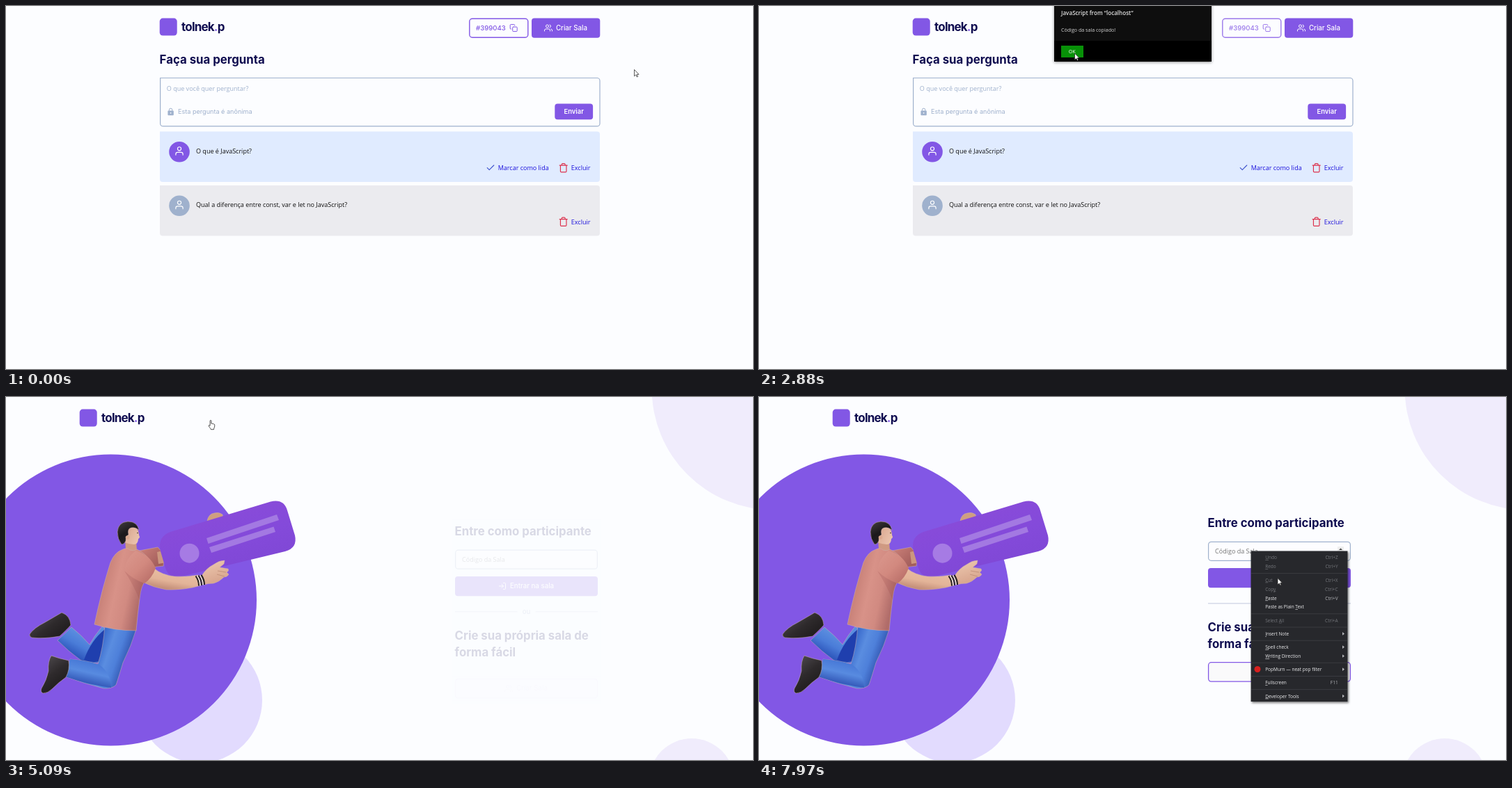
Animation, 1073 px wide and 522 px high, one loop 8 s. Source, as an HTML page with a canvas:

```html
<!DOCTYPE html>
<html lang="pt-BR">
<head>
<meta charset="utf-8">
<title>Sala de perguntas</title>
<style>
html, body { margin: 0; width: 100%; height: 100%; overflow: hidden; background: #fcfdff; }
canvas { position: absolute; left: 0; top: 0; }
#dialog {
  position: absolute; left: 424px; top: -20px; width: 226px; height: 100px;
  background: linear-gradient(#0e0e0e 70px, #000 70px);
  box-shadow: 0 1px 4px rgba(0, 0, 0, .45);
  transform-origin: 50% 44px;
  font: 7.1px/10px "Open Sans", sans-serif; color: #d4d4d4;
}
#dialog * { position: absolute; left: 10px; margin: 0; white-space: nowrap; }
#dialog h1 { top: 25px; font-size: 8.1px; font-weight: 600; color: #dedede; }
#dialog p { top: 49px; }
#dialog b {
  left: 9.5px; top: 77px; width: 32.5px; height: 17px; box-sizing: border-box;
  border: 1px solid #0a8f0a; font-weight: 400; line-height: 15px; text-align: center; color: #0fa00f;
}
#dialog b.hot { background: #079107; color: #fff; }
</style>
</head>
<body>
<canvas id="page" width="1073" height="522"></canvas>
<div id="dialog">
  <h1>JavaScript from “localhost”</h1>
  <p>Código da sala copiado!</p>
  <b id="ok">OK</b>
</div>
<canvas id="top" width="1073" height="522"></canvas>
<script>
const LOOP = 8000;
const PAPER = '#fcfdff', PURPLE = '#8257e5', NAVY = '#0e0b4f', STEEL = '#9fb1cd', LINK = '#1a10dc', RED = '#dc2f4b';
const BODY = '"Open Sans", "Noto Sans", sans-serif', HEAD = 'Inter, Roboto, sans-serif';
const $ = id => document.getElementById(id);
const c = $('page').getContext('2d'), top2d = $('top').getContext('2d');

// progress in n equal steps, the first at a and the last at b
const step = (t, a, b, n) =>
  t < a ? 0 : Math.min(1, (Math.floor((t - a + 8) * (n - 1) / (b - a)) + 1) / n);
const ease = p => p * p * (3 - 2 * p);

function text(s, x, y, size, color, weight = 400, family = BODY, align = 'left') {
  c.font = `${weight} ${size}px ${family}`;
  c.textAlign = align;
  c.fillStyle = color;
  c.fillText(s, x, y);
}
function box(x, y, w, h, r, fill, line, lw = 1.2) {
  c.beginPath();
  c.roundRect(x, y, w, h, r);
  if (fill) { c.fillStyle = fill; c.fill(); }
  if (line) { c.strokeStyle = line; c.lineWidth = lw; c.stroke(); }
}
function disc(x, y, r, fill) {
  c.beginPath();
  c.arc(x, y, r, 0, 7);
  c.fillStyle = fill;
  c.fill();
}
function shape(d, fill) {
  c.fillStyle = fill;
  c.fill(new Path2D(d));
}
// filled shape with a soft light rim
function solid(d, fill) {
  shape(d, fill);
  c.strokeStyle = 'rgba(205,175,175,.5)';
  c.lineWidth = 1;
  c.stroke(new Path2D(d));
}
function ramp(x0, y0, x1, y1, ...colors) {
  const g = c.createLinearGradient(x0, y0, x1, y1);
  colors.forEach((k, i) => g.addColorStop(i / (colors.length - 1), k));
  return g;
}

const ICONS = {
  user: 'M20 21v-2a4 4 0 0 0-4-4H8a4 4 0 0 0-4 4v2M16 7a4 4 0 1 1-8 0a4 4 0 1 1 8 0',
  users: 'M17 21v-2a4 4 0 0 0-4-4H5a4 4 0 0 0-4 4v2M13 7a4 4 0 1 1-8 0a4 4 0 1 1 8 0M23 21v-2a4 4 0 0 0-3-3.87M16 3.13a4 4 0 0 1 0 7.75',
  copy: 'M11 9h9a2 2 0 0 1 2 2v9a2 2 0 0 1-2 2h-9a2 2 0 0 1-2-2v-9a2 2 0 0 1 2-2M5 15H4a2 2 0 0 1-2-2V4a2 2 0 0 1 2-2h9a2 2 0 0 1 2 2v1',
  trash: 'M3 6H21M19 6v14a2 2 0 0 1-2 2H7a2 2 0 0 1-2-2V6m3 0V4a2 2 0 0 1 2-2h4a2 2 0 0 1 2 2v2',
  check: 'M20 6L9 17L4 12',
  enter: 'M15 3h4a2 2 0 0 1 2 2v14a2 2 0 0 1-2 2h-4M10 17L15 12L10 7M15 12H3'
};
function icon(name, x, y, scale, color, lw = 2) {
  c.save();
  c.translate(x - 12 * scale, y - 12 * scale);
  c.scale(scale, scale);
  c.strokeStyle = color;
  c.lineWidth = lw;
  c.lineCap = c.lineJoin = 'round';
  c.stroke(new Path2D(ICONS[name]));
  c.restore();
}

function logo(x) {
  box(x - .3, 17.6, 25, 25, 4.5, PURPLE);
  c.letterSpacing = '-0.8px';
  text('tolnek', x + 31, 36, 17, NAVY, 700, HEAD);
  let pen = x + 31 + c.measureText('tolnek').width;
  text('.', pen, 36, 17, PURPLE, 700, HEAD);
  pen += c.measureText('.').width;
  text('p', pen, 36, 17, NAVY, 700, HEAD);
  c.letterSpacing = '0px';
}

function question(y, s, fill, avatar) {
  box(221, y, 632, 72.5, [0, 4, 4, 4], fill);
  disc(249, y + 29.2, 14.8, avatar);
  icon('user', 249, y + 28, .64, '#fff', 1.8);
  text(s, 273, y + 31.4, 9.03, '#111');
  icon('trash', 800.7, y + 52.3, .61, RED, 1.9);
  text('Excluir', 811.8, y + 55.6, 9.03, LINK);
}

function room(hover) {
  logo(221);
  c.globalAlpha = hover ? .8 : 1;
  box(665.8, 18.2, 84, 27, 4, null, PURPLE, 1.4);
  text('#399043', 675, 34.8, 9.6, PURPLE, 500, HEAD);
  icon('copy', 729.2, 31.6, .5, PURPLE);
  c.globalAlpha = 1;
  box(755, 17.5, 98.3, 28.2, 4, PURPLE);
  icon('users', 779, 31.5, .5, '#fff');
  text('Criar Sala', 790, 34.7, 9.7, '#fff', 500, HEAD);
  text('Faça sua pergunta', 220.6, 82.7, 16.8, NAVY, 700, HEAD);

  box(221.6, 103.5, 631.4, 69.4, [0, 4, 4, 4], PAPER, STEEL);
  text('O que você quer perguntar?', 230.8, 122.4, 9.03, STEEL);
  box(232.4, 150.4, 8.4, 6.8, 1, STEEL);
  c.beginPath();
  c.arc(236.6, 149.4, 2.2, Math.PI, 0);
  c.lineTo(238.8, 151);
  c.moveTo(234.4, 149.4);
  c.lineTo(234.4, 151);
  c.strokeStyle = STEEL;
  c.lineWidth = 1;
  c.stroke();
  disc(236.6, 153.8, .9, PAPER);
  text('Esta pergunta é anônima', 247, 155.2, 9.1, STEEL, 400, HEAD);
  box(788.3, 140.6, 54.8, 22.6, 4, PURPLE);
  text('Enviar', 815.7, 155.2, 9.4, '#fff', 600, HEAD, 'center');

  question(180.5, 'O que é JavaScript?', '#e0ebff', PURPLE);
  icon('check', 696, 232.6, .6, '#3c50cc', 1.8);
  text('Marcar como lida', 706.7, 236.1, 9.03, LINK);
  question(258, 'Qual a diferença entre const, var e let no JavaScript?', '#ebebef', STEEL);
}

function card() {
  shape('M236 194L380 150.5Q399 146 404 163L415 199Q419 217 401 222L252 258Q234 262 229 246L222 222Q217 201 236 194Z',
    ramp(305, 170, 325, 245, '#884bd9', '#844ada', '#8048d6'));
  disc(263.5, 224.7, 14, '#a67be4');
  shape('M288 203L389 169L392 177L290.500 211Z', '#a379e2');
  shape('M292 216L384.500 186.500L387 194L295 224Z', '#a379e2');
}

function figure() {
  const skin = ramp(235, 250, 230, 278, '#e8bda2', '#e3b498', '#bd8672');
  const black = (x, y) => ramp(x, y, x + 30, y + 40, '#4c484b', '#2e2a2c', '#1d1a1b');
  // far arm
  solid('M289 178Q291 168 299 167Q306 165 311 169L312 175L300 182Z', '#cf9f80');
  solid('M186 222L218 216Q229 226 226 243L200 246Z', ramp(190, 220, 215, 246, '#cb8078', '#a25d5b'));
  shape('M217 223L229 220L230 238L219 240Z', '#cc977f');
  card();
  // far leg
  solid('M94 331Q108 342 120 356Q128 342 138 330L166 350L140 380Q120 386 108 379Q90 366 74 350Z',
    ramp(105, 340, 90, 366, '#5a8ddf', '#4a7cd8', '#2f58bd'));
  shape('M142 334Q122 350 112 378Q126 384 142 378Z', '#1f3fae');
  solid('M34 341Q40 332 56 324L80 310Q92 314 93 328Q88 334 77 344Q55 348 37 346Q33 344 34 341Z', black(45, 312));
  // near leg
  solid('M142 328L187 334Q180 358 168 382Q162 402 158 414Q152 420 140 419Q112 412 85 402L92 377Q115 379 132 384Q140 360 142 328Z',
    ramp(134, 362, 174, 376, '#3c6dce', '#5a8de0', '#4e80da', '#3459b4'));
  shape('M85 402L92 377Q115 379 134 385Q150 396 151 418Q120 414 85 402Z',
    ramp(115, 379, 108, 410, '#4677d6', '#588be0', '#3358b8'));
  solid('M65 372Q76 376 90 379Q92 392 86 403Q76 410 66 420Q60 426 53 426Q49 424 51 419Q58 408 61 394Q60 380 65 372Z', black(55, 376));
  // head
  shape('M171 205L187 207L188 221Q180 226 172 219Z', '#cf9a82');
  disc(178, 198, 13, '#e3b69e');
  shape('M188 190Q190 197 192 201Q192 203 190 204Q190 211 184 212L176 211L174 190Z', ramp(174, 195, 193, 205, '#dcac95', '#ecc6b0'));
  solid('M160 194Q161 180 175 179Q189 179 191 192Q187 187 180 188Q174 189 176 198Q172 200 172 207Q170 212 166 212Q160 204 160 194Z',
    ramp(162, 180, 180, 212, '#403b3d', '#1c191b', '#262224'));
  disc(174.5, 202, 2.8, '#dba98f');
  disc(189, 195.5, .8, '#2a2022');
  // shirt
  solid('M168 219Q174 216 178 220Q184 222 188 219Q204 226 214 246Q210 258 201 264Q194 270 192 290Q189 312 187 336Q155 336 127 327Q132 303 139 276Q145 254 150 238Q156 223 168 219Z',
    ramp(138, 280, 192, 292, '#c98279', '#d89288', '#d18a81', '#b06c69'));
  shape('M170 250Q181 258 198 267Q193 276 192 292Q182 268 170 250Z', 'rgba(150,75,75,.22)');
  // near arm
  solid('M212 246Q224 256 242 258Q258 259 276 256L280 271Q256 278 230 277Q212 274 196 266Q208 260 212 246Z', skin);
  shape('M186 221Q206 226 215 246Q210 260 199 268Q182 262 170 250Q172 232 186 221Z',
    ramp(176, 232, 206, 262, '#d89389', '#d2897f', '#bd736c'));
  solid('M281 257Q288 246 298 241Q306 235 314 235L313 240L307 245L319 247Q321 250 317 252L320 255Q318 259 313 259Q306 266 298 268Q290 268 284 270Z',
    ramp(290, 240, 300, 270, '#eac3aa', '#d6a38b'));
  c.strokeStyle = '#bd8b74';
  c.lineWidth = .8;
  c.stroke(new Path2D('M304 250L316 252M303 255L314 258'));
  for (let i = 0; i < 5; i++) {
    c.strokeStyle = i % 2 ? '#e0d2cc' : '#231f21';
    c.lineWidth = 2;
    c.beginPath();
    c.moveTo(272.5 + i * 2, 257.5 - i * .4);
    c.quadraticCurveTo(277 + i * 2, 263, 277 + i * 2, 271.5 - i * .4);
    c.stroke();
  }
}

// fades everything in a region of the plain page
function veil(y, h, p) {
  c.globalAlpha = 1 - p;
  c.fillStyle = PAPER;
  c.fillRect(640, y, 215, h);
  c.globalAlpha = 1;
}

function form(p, spin) {
  const drop = 14 * (1 - p);
  c.save();
  c.translate(0, drop * 2);
  box(645.6, 381.7, 203.8, 27.4, 4, '#fafafb', PURPLE, 1.3);
  icon('users', 722, 395.4, .5, PURPLE);
  text('Criar Sala', 733, 398.6, 9.7, PURPLE, 500, HEAD);
  veil(378, 35, p);
  c.translate(0, -drop);
  text('Entre como participante', 644.6, 187.3, 16.75, NAVY, 700, HEAD);
  box(645.6, 208.3, 203.8, 27, 4, '#fdfdff', STEEL);
  text('Código da Sala', 655, 225.2, 9.03, '#757575');
  if (spin) {
    box(831, 215, 9, 14, 0, '#efefef');
    shape('M833 220L835.500 217.500L838 220Z', '#444');
    shape('M833 224L835.500 226.500L838 224Z', '#444');
  }
  box(645, 246, 205, 28.3, 4, PURPLE);
  icon('enter', 713, 260, .5, '#fff');
  text('Entrar na sala', 724, 263.2, 9.7, '#fff', 500, HEAD);
  c.fillStyle = '#c6cde0';
  c.fillRect(645, 296.3, 89.5, 1.1);
  c.fillRect(760.5, 296.3, 89.5, 1.1);
  text('ou', 747.5, 300, 9.7, STEEL, 500, HEAD, 'center');
  text('Crie sua própria sala de', 644.6, 337.2, 16.75, NAVY, 700, HEAD);
  text('forma fácil', 644.6, 361, 16.75, NAVY, 700, HEAD);
  veil(165, 265, p);
  c.restore();
}

// label (& marks the access key), y, key hint, state: 0 off, 1 on, 2 submenu
const MENU = [
  ['&Undo', 231, 'Ctrl+Z', 0], ['&Redo', 244, 'Ctrl+Y', 0], ['&Cut', 263.3, 'Ctrl+X', 0],
  ['Cop&y', 276.2, 'Ctrl+C', 0], ['&Paste', 289.2, 'Ctrl+V', 1], ['Paste as Plain &Text', 302, '', 1],
  ['Select &All', 321.4, 'Ctrl+A', 0], ['&Insert Note', 340.6, '', 2], ['&Spell check', 359.8, '', 2],
  ['&Writing Direction', 372.7, '', 2], ['PopMurn — neat pop filter', 391.8, '', 2],
  ['&Fullscreen', 411, 'F11', 1], ['&Developer Tools', 430.3, '', 2]
];
function menu(alpha) {
  c.save();
  c.globalAlpha = alpha;
  c.shadowColor = 'rgba(0,0,0,.5)';
  c.shadowBlur = 3;
  c.shadowOffsetX = c.shadowOffsetY = 1.5;
  box(706.6, 221.6, 138.8, 216.4, 0, '#27282c');
  c.shadowColor = 'transparent';
  MENU.forEach(([label, y, hint, state], i) => {
    const color = state ? '#ececee' : '#74767b', at = label.indexOf('&'), s = label.replace('&', '');
    if (i && y - MENU[i - 1][1] > 15) {
      c.fillStyle = '#3f4045';
      c.fillRect(707, y - 10, 138, .8);
    }
    text(s, 727.2, y + 2.4, 6.5, color);
    if (at >= 0) {
      const x = c.measureText(s.slice(0, at)).width;
      c.fillRect(727.2 + x, y + 3.3, c.measureText(s[at]).width, .6);
    }
    if (hint) text(hint, 831.6, y + 2.4, 6.5, state ? '#b4b5b9' : color, 400, BODY, 'right');
    if (state === 2) shape(`M838 ${y - 2.5}L841 ${y - .2}L838 ${y + 2.1}Z`, '#b4b5b9');
  });
  disc(716, 391.5, 4.5, '#d8201f');
  c.restore();
}

function home(t, spin) {
  if (t >= 5090) {
    disc(1102, -12, 174.4, '#f0ecfc');
    disc(985, 552, 61, '#f0ecfc');
    disc(278, 436, 90, '#e2dbfe');
    disc(150.5, 292, 209.5, PURPLE);
    figure();
    form(step(t, 5090, 5420, 5) ** 1.18, spin);
  }
  logo(106);
  if (t >= 7110) menu(step(t, 7110, 7270, 3));
}

// pointer path: start, end, steps, x, y
const MOVES = [
  [150, 880, 10, 702.5, 50.5], [960, 1110, 3, 710, 33.5], [2270, 2880, 9, 453.5, 68],
  [3740, 4230, 7, 295.5, 27], [4380, 4460, 2, 290, 36], [4540, 4610, 2, 294, 33.5],
  [5490, 5870, 6, 603, 140], [5940, 6710, 11, 706, 221], [7580, 7970, 6, 745, 260.5]
];
function pointerAt(t) {
  let x = 902.5, y = 91.5;
  for (const [a, b, n, tx, ty] of MOVES) {
    const p = ease(step(t, a, b, n));
    x += (tx - x) * p;
    y += (ty - y) * p;
  }
  return { x, y };
}
const POINTERS = {
  arrow: [.57, 0, 'M0 0V16.500L4 13L6.500 18.500L9 17.500L6.500 12H11.500Z'],
  hand: [.6, 6.5, 'M5 1.500a1.500 1.500 0 0 1 3 0V8c.5-1 2.600-.8 2.800.6c.8-.9 2.600-.5 2.800.8c1-.6 2.400 0 2.400 1.600V14c0 3-2 4-2 8H7c0-2-3.500-5-5-8c-1-2 1-3 2.200-1.500L5 13Z']
};
function pointer(kind, { x, y }) {
  top2d.clearRect(0, 0, 1073, 522);
  top2d.save();
  top2d.translate(x, y);
  top2d.strokeStyle = '#222';
  if (kind === 'beam') {
    top2d.lineWidth = .9;
    top2d.stroke(new Path2D('M-2.500 -6.500H2.500M0 -6.500V6.500M-2.500 6.500H2.500'));
  } else {
    const [k, hot, d] = POINTERS[kind], path = new Path2D(d);
    top2d.scale(k, k);
    top2d.translate(-hot, 0);
    top2d.lineWidth = 1.3;
    top2d.lineJoin = 'round';
    top2d.fillStyle = '#fff';
    top2d.fill(path);
    top2d.stroke(path);
  }
  top2d.restore();
}

function dialog(t, pos) {
  const p = step(t, 1660, 1970, 5), out = step(t, 3440, 3510, 2), el = $('dialog');
  const alpha = Math.min(1, p / .69) * (1 - out);
  el.style.visibility = alpha > 0 ? 'visible' : 'hidden';
  el.style.opacity = alpha;
  el.style.transform = p < 1
    ? `translateY(${-11 * (1 - p)}px) perspective(825px) rotateX(${75 * (1 - p)}deg)` : 'none';
  $('ok').className = t > 2270 && pos.x < 466 && pos.y > 57 ? 'hot' : '';
}

function frame() {
  const t = performance.now() % LOOP, pos = pointerAt(t);
  const inField = t >= 5940 && pos.x > 645 && pos.y > 208;
  const onLogo = t > 3740 && t < 5420 && pos.x < 314 && pos.y < 44;
  c.fillStyle = PAPER;
  c.fillRect(0, 0, 1073, 522);
  if (t < 4930) room(t >= 1030 && t < 3740);
  else home(t, inField);
  dialog(t, pos);
  const kind = (t >= 960 && t < 1970) || onLogo ? 'hand' : inField && t < 7110 ? 'beam' : 'arrow';
  pointer(kind, pos);
  requestAnimationFrame(frame);
}
frame();
</script>
</body>
</html>
```
